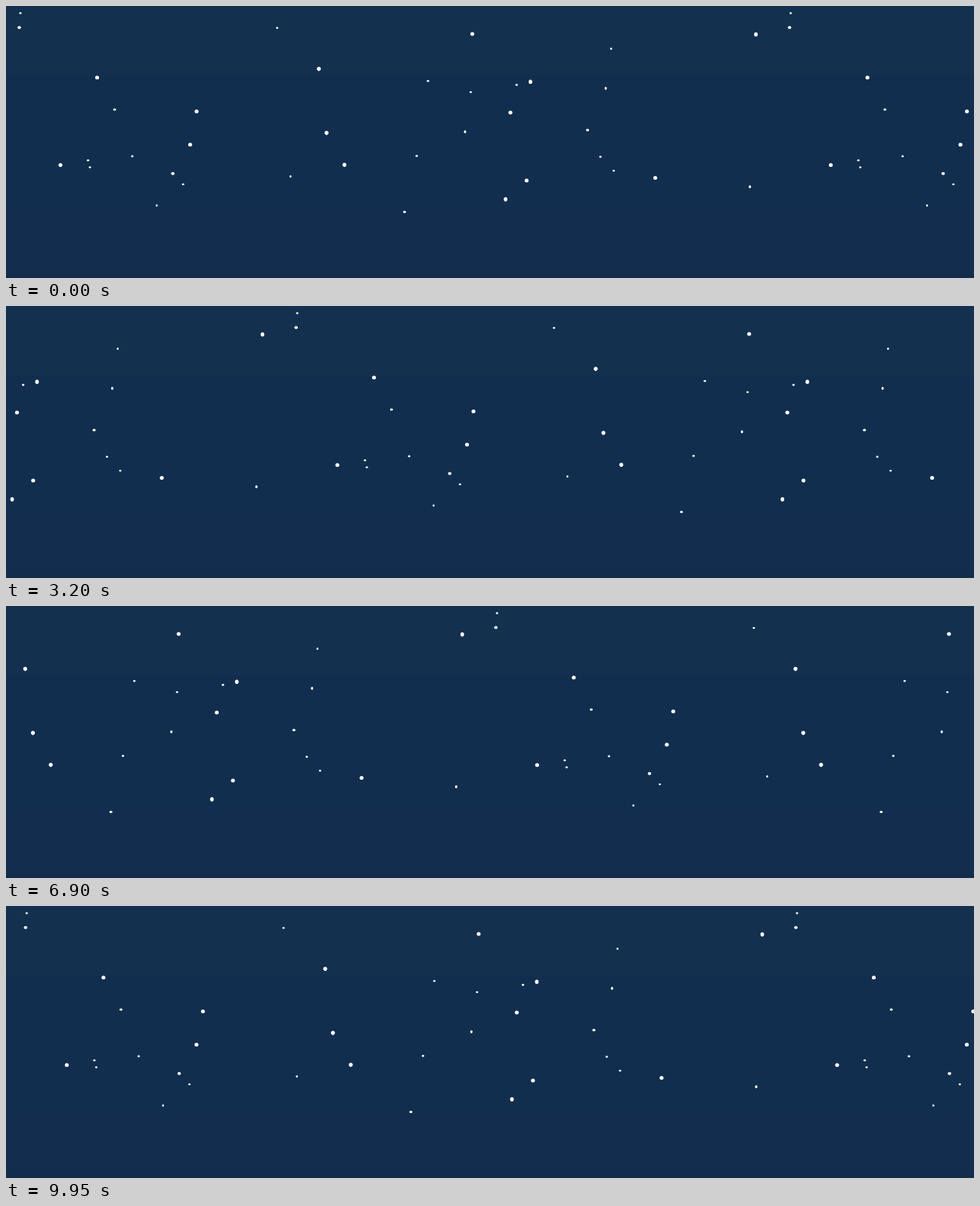
Write an HTML page with a canvas that moves like this. It is 1280 by 360 pixels and loops after 10 s.

```html
<!DOCTYPE html>
<html lang="en">
<head>
<meta charset="utf-8">
<title>Drifting stars</title>
<style>
  html, body { margin: 0; width: 100%; height: 100%; overflow: hidden; background: #122e4e; }
  canvas { display: block; width: 1280px; height: 360px; }
</style>
</head>
<body>
<canvas id="sky" width="1280" height="360"></canvas>
<script>
const W = 1280, H = 360;
const LOOP = 10000, STEP = 50;
const SPEED = 0.2039;   // px per ms, leftwards
const TILE = 1018.6;    // width of the repeating star field
const ctx = document.getElementById('sky').getContext('2d');

// Sky bands: top edge and colour
const bands = [[0, '#13304f'], [92, '#122e4e'], [275, '#132d4e'], [356, '#122b4a']];

// Stars grouped by half width and half height
const groups = [
  { rx: 2.6, ry: 2.5, at: [[120.5, 94.7], [252, 139.5], [243.5, 183.5], [72, 210.5],
    [616.6, 37], [667, 141], [688.4, 231], [858.5, 227.5]] },
  { rx: 2.4, ry: 2.9, at: [[693.5, 100.3], [660.6, 255.8], [991.6, 37.6]] },
  { rx: 2.6, ry: 2.6, drop: true, at: [[413.7, 83], [423.9, 167.8], [447.5, 210]] },
  { rx: 2.3, ry: 2, at: [[17.5, 28.6], [220.6, 221.8]] },
  { rx: 2, ry: 1.6, at: [[143.6, 137], [527, 272.5], [769, 164.2]] },
  { rx: 1.5, ry: 2, at: [[607, 166.6], [793, 109], [983.6, 239.2]] },
  { rx: 1.6, ry: 1.3, at: [[19, 9.5], [167, 198.9], [108.5, 204.2], [111, 213.5], [234.2, 236],
    [358.6, 29], [543, 198.4], [558, 99.3], [614.5, 114], [675.2, 104.4], [786, 199.6], [803.6, 218]] },
  { rx: 1.3, ry: 1.6, at: [[199.3, 264], [376.2, 225.6], [800.2, 56.5]] }
];

function star(x, y, { rx, ry, drop }) {
  ctx.beginPath();
  ctx.ellipse(x, y, rx, ry, 0, 0, Math.PI * 2);
  ctx.fill();
  if (!drop) return;
  ctx.beginPath();
  ctx.moveTo(x - rx * 0.8, y + 1.2);
  ctx.lineTo(x + rx * 0.8, y + 1.2);
  ctx.lineTo(x, y + ry + 0.7);
  ctx.fill();
}

function draw(time) {
  const t = Math.floor((time % LOOP) / STEP) * STEP;
  const shift = (t * SPEED) % TILE;

  bands.forEach(([y, color]) => {
    ctx.fillStyle = color;
    ctx.fillRect(0, y, W, H - y);
  });

  ctx.fillStyle = '#fff';
  for (let left = -shift - TILE; left < W; left += TILE)
    for (const group of groups)
      for (const [x, y] of group.at) star(left + x, y, group);
}

let start;
function tick(now) {
  start ??= now;
  draw(now - start);
  requestAnimationFrame(tick);
}
draw(0);
requestAnimationFrame(tick);
</script>
</body>
</html>
```
